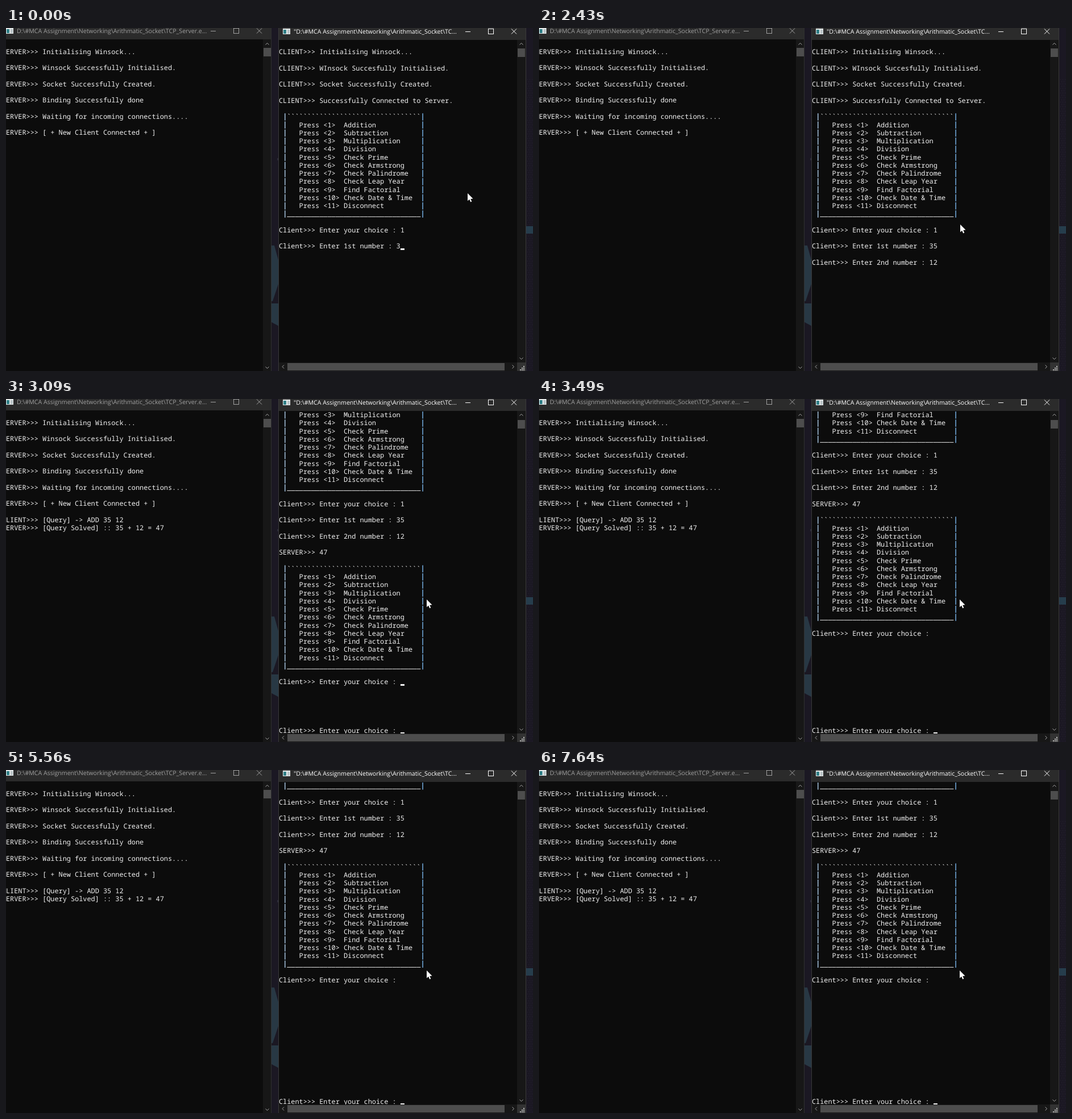
These frames come from a looping animation (927 px wide and 604 px high, 8000 ms). An HTML page with a canvas:

```html
<!DOCTYPE html>
<html>
<head>
<meta charset="utf-8">
<style>
  html, body { margin: 0; width: 100%; height: 100%; overflow: hidden; background: #0c0c0c; }
  canvas { display: block; }
</style>
</head>
<body>
<canvas id="stage" width="927" height="604"></canvas>
<script>
const ctx = document.getElementById('stage').getContext('2d');
const LOOP = 8000, CELL = 7.13, LINE = 14.25;
const MONO = '500 11.885px "Noto Sans Mono", "DejaVu Sans Mono", monospace';
const UI = '10.6px "Open Sans", "Noto Sans", sans-serif';
const TEXT = '#f2f2f2';

// Timelines: [start in ms, value]
const firstNumber = [[0, '3'], [250, '35']];
const secondNumber = [[0, null], [830, ''], [1910, '1'], [2280, '12']];
const scrollRow = [[0, 0], [2720, 6], [3090, 12], [3490, 18], [3920, 21]];
const caretOn = [0, 400, 830, 1370, 1910, 2430, 2720, 3490, 4040, 4470, 5000, 5560, 6120, 6680, 7240, 7640]
  .map((t, i) => [t, i % 2 === 0]);
const pointer = [[0, [812, 291]], [980, [782, 315]], [1100, [752, 339]], [1220, [741, 346]], [2840, [740, 353]]];
const at = (timeline, t) => timeline.findLast(([start]) => start <= t)[1];

const MENU = ['Addition', 'Subtraction', 'Multiplication', 'Division', 'Check Prime', 'Check Armstrong',
  'Check Palindrome', 'Check Leap Year', 'Find Factorial', 'Check Date & Time', 'Disconnect'];
const PROMPT = 'Client>>> Enter your choice : ';

const SERVER_LOG = [
  [1, 'ERVER>>> Initialising Winsock...'],
  [3, 'ERVER>>> Winsock Successfully Initialised.'],
  [5, 'ERVER>>> Socket Successfully Created.'],
  [7, 'ERVER>>> Binding Successfully done'],
  [9, 'ERVER>>> Waiting for incoming connections....'],
  [11, 'ERVER>>> [ + New Client Connected + ]']
];
const SERVER_REPLY = [
  [13, 'LIENT>>> [Query] -> ADD 35 12'],
  [14, 'ERVER>>> [Query Solved] :: 35 + 12 = 47']
];

function menuRows(top) {
  const bar = (row, body) => [row, ' |' + body.padEnd(33) + '|'];
  return [
    bar(top, '`'.repeat(33)),
    ...MENU.map((name, i) => bar(top + 1 + i, '   Press ' + `<${i + 1}>`.padEnd(5) + name)),
    bar(top + 12, '_'.repeat(33))
  ];
}

function clientLog(t) {
  const second = at(secondNumber, t);
  const log = [
    [1, 'CLIENT>>> Initialising Winsock...'],
    [3, 'CLIENT>>> WInsock Succesfully Initialised.'],
    [5, 'CLIENT>>> Socket Successfully Created.'],
    [7, 'CLIENT>>> Successfully Connected to Server.'],
    ...menuRows(9),
    [23, PROMPT + '1'],
    [25, 'Client>>> Enter 1st number : ' + at(firstNumber, t)]
  ];
  if (second !== null) log.push([27, 'Client>>> Enter 2nd number : ' + second]);
  if (t >= 2720) log.push([29, 'SERVER>>> 47'], ...menuRows(31), [45, PROMPT]);
  return log;
}

function rect(x, y, w, h, color) {
  ctx.fillStyle = color;
  ctx.fillRect(x, y, w, h);
}

function polygon(color, ...points) {
  ctx.fillStyle = color;
  ctx.beginPath();
  points.forEach(([x, y]) => ctx.lineTo(x, y));
  ctx.fill();
}

function stroke(color, ...points) {
  ctx.strokeStyle = color;
  ctx.beginPath();
  points.forEach(([x, y], i) => i ? ctx.lineTo(x, y) : ctx.moveTo(x, y));
  ctx.stroke();
}

function print(x, y, row, line) {
  const baseline = y + 11 + row * LINE;
  ctx.fillStyle = TEXT;
  ctx.font = MONO;
  ctx.fillText(line.replace(/\|/g, ' '), x, baseline);
  if (line[1] === '|') {
    rect(x + 10, baseline - 10, 1.5, 12.6, '#a4c2de');
    rect(x + 252.3, baseline - 10, 1.5, 12.6, '#74aee2');
  }
}

function caret(x, y, row, col) {
  rect(x + col * CELL, Math.round(y + row * LINE + 10.5), 7, 3, TEXT);
}

function titleBar(x, width, height, y, title, color, fill) {
  rect(x, 0, width, height, fill);
  const icon = x + 7;
  rect(icon, y - 5, 13, 10, '#e4e8e8');
  rect(icon + 1, y - 3, 5, 7, '#2f7f86');
  rect(icon + 8, y - 3, 4, 7, '#b9c3c6');
  ctx.font = UI;
  ctx.fillStyle = color;
  ctx.fillText(title, x + 26, y + 4);
  const right = x + width;
  stroke(color, [right - 106, y + .5], [right - 97, y + .5]);
  ctx.strokeRect(right - 65.5, y - 4.5, 9, 9);
  stroke(color, [right - 25, y - 4.5], [right - 16, y + 4.5]);
  stroke(color, [right - 16, y - 4.5], [right - 25, y + 4.5]);
}

function chevron(x, y, dx, dy) {
  stroke('#a8a8a8', [x - 3 * dy - 1.5 * dx, y - 3 * dx - 1.5 * dy],
    [x + 1.5 * dx, y + 1.5 * dy], [x + 3 * dy - 1.5 * dx, y + 3 * dx - 1.5 * dy]);
}

function scrollBar(x, top, bottom, thumbY) {
  rect(x, top, 15, bottom - top, '#171717');
  rect(x + 1, thumbY, 13, 15, '#4d4d4d');
  chevron(x + 7.5, 28, 0, -1);
  chevron(x + 7.5, bottom - 7, 0, 1);
}

function desktop() {
  rect(0, 0, 927, 604, '#1b1823');
  for (let y = 90; y < 604; y += 4)
    for (let x = 916 + y % 8 / 2; x < 927; x += 4) rect(x, y, 1, 1, '#272331');
  rect(915, 349, 12, 13, '#263d4c');
  polygon('#283844', [467, 383], [472, 383], [480, 412], [480, 448], [469, 481], [467, 481]);
  polygon('#283844', [467, 485], [480, 485], [480, 525], [467, 518]);
  rect(477, 229, 2, 4, '#2b2b38');
}

function serverWindow(t) {
  rect(0, 0, 467, 604, '#0c0c0c');
  titleBar(-7, 473, 20, 5, 'D:\\#MCA Assignment\\Networking\\Arithmatic_Socket\\TCP_Server.e...', '#a0a0a0', '#2b2b2b');
  scrollBar(452, 20, 605, 35);
  rect(466, 0, 1, 604, '#303030');
  const log = t < 2720 ? SERVER_LOG : [...SERVER_LOG, ...SERVER_REPLY];
  log.forEach(([row, line]) => print(0, 20.25, row, line));
}

function clientWindow(t) {
  const x = 480, y = 21, top = at(scrollRow, t), log = clientLog(t);
  rect(479, 0, 436, 604, '#3a3a3a');
  rect(x, y, 434, 583, '#0c0c0c');
  titleBar(x, 434, 21, 6, '"D:\\#MCA Assignment\\Networking\\Arithmatic_Socket\\TC...', '#ffffff', '#2b2b2b');

  ctx.save();
  ctx.beginPath();
  ctx.rect(x, y, 419, 568);
  ctx.clip();
  log.forEach(([row, line]) => print(x, y, row - top, line));
  const [lastRow, lastLine] = log.at(-1);
  if (at(caretOn, t)) caret(x, y, lastRow - top, lastLine.length);
  // Stale prompt left on the bottom row after scrolling
  if (t >= 3090) {
    print(x, y, 39, PROMPT);
    caret(x, y, 39, PROMPT.length);
  }
  ctx.restore();

  scrollBar(899, y, 589, t < 3090 ? 36 : 37);
  rect(x, 589, 419, 15, '#171717');
  rect(495, 590, 382, 13, '#4d4d4d');
  chevron(487.5, 596.5, -1, 0);
  chevron(892, 596.5, 1, 0);
  rect(899, 589, 15, 15, '#333333');
  for (let i = 0; i < 3; i++)
    for (let j = 2 - i; j < 3; j++) rect(904 + j * 3, 595 + i * 3, 2, 2, '#bfbfbf');
}

function drawPointer([x, y]) {
  ctx.save();
  ctx.translate(x, y);
  polygon('#ffffff', [0, 0], [0, 13.5], [3.1, 10.7], [5.2, 15.5], [7.3, 14.6], [5.2, 9.9], [9.5, 9.6]);
  ctx.restore();
}

function draw(now) {
  const t = now % LOOP;
  ctx.textRendering = 'geometricPrecision';
  ctx.lineWidth = 1;
  desktop();
  serverWindow(t);
  clientWindow(t);
  drawPointer(at(pointer, t));
  requestAnimationFrame(draw);
}
requestAnimationFrame(draw);
</script>
</body>
</html>
```
